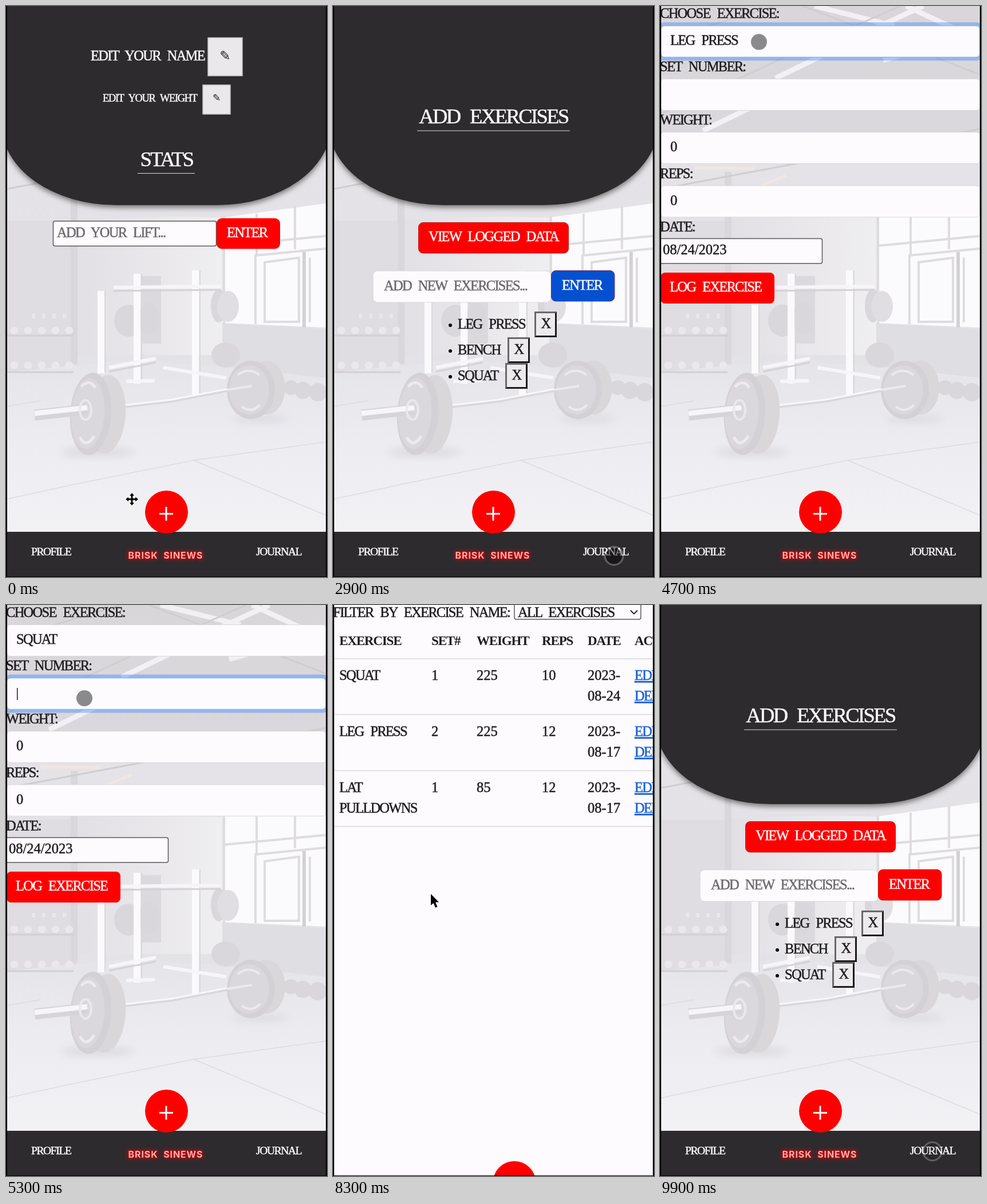
Write an HTML page that moves like this. It is 561 by 998 pixels and loops after 10000 ms.

```html
<!DOCTYPE html>
<html lang="en">
<head>
<meta charset="utf-8">
<title>Workout log</title>
<style>
html, body { margin: 0; width: 100%; height: 100%; overflow: hidden; background: #000; }
svg { display: block; width: 561px; height: 998px; }
text {
  font: 24.5px "Liberation Serif", serif; letter-spacing: -.07em; word-spacing: .3em;
  fill: currentColor; stroke: currentColor; stroke-width: .5px; white-space: pre;
}
.h { font-size: 36.5px; }
.s { font-size: 18.4px; }
.nav { font-size: 19.5px; }
.n { letter-spacing: 0; }
.b { font-size: 23px; font-weight: bold; letter-spacing: -.05em; stroke-width: 0; }
.pen { font-family: "DejaVu Sans", sans-serif; stroke-width: 0; }
.brand { font: 700 16px Inter, sans-serif; letter-spacing: .9px; stroke: #f22; stroke-width: .7px; filter: drop-shadow(0 0 4px #f00); }
.light { color: #fcfafd; }
.dark { color: #1f1d20; }
.hint { color: #6c6a6d; }
.link { color: #1a62d8; text-decoration: underline; }
.bar { fill: #2d2b2e; }
.red { fill: #f00; }
.in { fill: #fdfbfe; stroke: #d9d7dc; x: 1.5px; width: 557.5px; height: 55px; rx: 6px; }
.box { fill: #fdfbfe; stroke: #5a585b; stroke-width: 1.5; }
.rule { fill: none; stroke: #d9d8dc; stroke-width: 1.5; }

/* one percent is 100 ms */
.profile, .add, .form, .table, .squat, .blue, .ph, .typed, .old, .new, .z1, .z2, .key, .caret, .move, .touch, .arrow {
  animation: 10s step-end infinite;
}
.profile { animation-name: profile; }
.add { animation-name: add; }
.form { animation-name: form; }
.table { animation-name: table; }
.squat { animation-name: squat; }
.blue { animation-name: blue; }
.ph { animation-name: ph; }
.typed { animation-name: typed; }
.old { animation-name: old; }
.new { animation-name: new; }
.z1 { animation-name: z1; }
.z2 { animation-name: z2; }
.caret { animation-name: caret; }
.move { animation-name: move; }
.touch { animation-name: touch; }
.arrow { animation-name: arrow; }
.key { animation-name: key; animation-delay: calc(var(--t) - 17.5s); }
@keyframes profile { 0% { opacity: 1 } 5%, 100% { opacity: 0 } }
@keyframes add { 0% { opacity: 0 } 5% { opacity: 1 } 37% { opacity: 0 } 94%, 100% { opacity: 1 } }
@keyframes form { 0% { opacity: 0 } 37% { opacity: 1 } 76% { opacity: 0 } 88% { opacity: 1 } 94%, 100% { opacity: 0 } }
@keyframes table { 0% { opacity: 0 } 76% { opacity: 1 } 88%, 100% { opacity: 0 } }
@keyframes squat { 0% { opacity: 0 } 24%, 100% { opacity: 1 } }
@keyframes blue { 0% { opacity: 0 } 24% { opacity: 1 } 37%, 100% { opacity: 0 } }
@keyframes ph { 0% { opacity: 1 } 15% { opacity: 0 } 24%, 100% { opacity: 1 } }
@keyframes typed { 0% { opacity: 1 } 24%, 100% { opacity: 0 } }
@keyframes old { 0% { opacity: 1 } 50% { opacity: 0 } 88%, 100% { opacity: 1 } }
@keyframes new { 0% { opacity: 0 } 50% { opacity: 1 } 88%, 100% { opacity: 0 } }
@keyframes z1 { 0% { opacity: 1 } 62% { opacity: 0 } 88%, 100% { opacity: 1 } }
@keyframes z2 { 0% { opacity: 1 } 70% { opacity: 0 } 88%, 100% { opacity: 1 } }
@keyframes key { 0% { visibility: hidden } 75%, 100% { visibility: visible } }
@keyframes caret {
  0% { transform: translate(-9px, 0) }
  11% { transform: translate(89px, 480px) }
  15% { transform: translate(102px, 480px) }
  16% { transform: translate(118px, 480px) }
  17% { transform: translate(135px, 480px) }
  18% { transform: translate(151px, 480px) }
  19% { transform: translate(165px, 480px) }
  23.5% { transform: translate(-9px, 0) }
  51.2% { transform: translate(19px, 145px) }
  55.5% { transform: translate(31px, 145px) }
  60% { transform: translate(31px, 238px) }
  63% { transform: translate(43px, 238px) }
  64% { transform: translate(56px, 238px) }
  67.2% { transform: translate(31px, 331px) }
  71% { transform: translate(43px, 331px) }
  74%, 100% { transform: translate(-9px, 0) }
}

.ring { opacity: 0; fill: none; animation: 10s linear infinite; }
.ring rect { x: -1.5px; width: 563.5px; height: 61px; rx: 9px; stroke: #0d6efd; stroke-opacity: .32; stroke-width: 6; }
.ring .in { fill: none; x: 1.5px; width: 557.5px; height: 55px; rx: 6px; stroke: #86b7fe; stroke-opacity: 1; stroke-width: 1.5; }
.ring .name { x: 67px; width: 317px; }
.r0 { animation-name: r0; }
.r1 { animation-name: r1; }
.r2 { animation-name: r2; }
.r3 { animation-name: r3; }
.r4 { animation-name: r4; }
@keyframes r0 { 0%, 11% { opacity: 0 } 12.5%, 23.5% { opacity: 1 } 25%, 100% { opacity: 0 } }
@keyframes r1 { 0%, 42% { opacity: 0 } 43.5%, 51% { opacity: 1 } 52.5%, 100% { opacity: 0 } }
@keyframes r2 { 0%, 51% { opacity: 0 } 52.5%, 59.5% { opacity: 1 } 61%, 100% { opacity: 0 } }
@keyframes r3 { 0%, 59.5% { opacity: 0 } 61%, 67.2% { opacity: 1 } 68.7%, 100% { opacity: 0 } }
@keyframes r4 { 0%, 67.2% { opacity: 0 } 68.7%, 74% { opacity: 1 } 75.5%, 100% { opacity: 0 } }

.cursor { animation: path 10s ease-in-out infinite; }
.disc { animation: disc 10s linear infinite; }
@keyframes path {
  0% { transform: translate(220px, 862px) }
  2% { transform: translate(262px, 950px) }
  4%, 6% { transform: translate(280px, 890px) }
  10.5%, 19% { transform: translate(190px, 492px) }
  23%, 25% { transform: translate(436px, 490px) }
  29%, 37.5% { transform: translate(491px, 961px) }
  41%, 46% { transform: translate(180px, 59px) }
  49%, 50.2% { transform: translate(150px, 75px) }
  51.5%, 57% { transform: translate(137px, 163px) }
  59.5%, 65% { transform: translate(150px, 252px) }
  67%, 71% { transform: translate(163px, 353px) }
  74.5%, 84% { transform: translate(171px, 505px) }
  91%, 94.5% { transform: translate(280px, 888px) }
  98.5%, 100% { transform: translate(476px, 955px) }
}
@keyframes disc { 0%, 97% { opacity: 1 } 98.8%, 100% { opacity: .15 } }
@keyframes move { 0% { opacity: 1 } 1.5%, 100% { opacity: 0 } }
@keyframes touch { 0% { opacity: 0 } 1.5% { opacity: 1 } 76% { opacity: 0 } 90%, 100% { opacity: 1 } }
@keyframes arrow { 0% { opacity: 0 } 76% { opacity: 1 } 90%, 100% { opacity: 0 } }
</style>
</head>
<body>
<svg viewBox="0 0 561 998">
  <defs>
    <linearGradient id="room" x2="0" y2="1">
      <stop offset="0" stop-color="#d9d6da"/><stop offset=".36" stop-color="#dad8dc"/>
      <stop offset=".42" stop-color="#e5e3e7"/><stop offset=".64" stop-color="#e3e2e6"/>
    </linearGradient>
    <linearGradient id="floor" x2="0" y2="1">
      <stop offset="0" stop-color="#e4e4e9"/><stop offset=".5" stop-color="#edecf1"/><stop offset="1" stop-color="#f2f1f4"/>
    </linearGradient>
    <linearGradient id="wall"><stop offset="0" stop-color="#e2e0e4"/><stop offset="1" stop-color="#efeef1"/></linearGradient>
    <filter id="soft"><feGaussianBlur stdDeviation="7"/></filter>
    <filter id="drop" x="-5%" width="110%" height="115%" color-interpolation-filters="sRGB">
      <feDropShadow dx="0" dy="4" stdDeviation="5" flood-opacity=".5"/>
    </filter>
    <path id="head" class="bar" filter="url(#drop)" d="M-8 0H569V206A200 142 0 0 1 369 348H192A200 142 0 0 1 -8 206Z"/>
    <g id="x">
      <path fill="#eceaed" d="M0 0h39v45H0z"/>
      <path fill="#6a686b" d="M0 45V0H39L36 3H3V42Z"/><path fill="#1c1a1d" d="M39 0V45H0L3 42H36V3Z"/>
      <text x="19.5" y="29" text-anchor="middle" class="dark">X</text>
    </g>
    <g id="plus">
      <circle r="37.5" class="red"/><path d="M-12.5 3H11.5M-.5 -9V15" stroke="#fff" stroke-width="3"/>
    </g>
  </defs>

  <g id="gym" fill="none">
    <rect width="561" height="640" fill="url(#room)"/>
    <path fill="url(#wall)" d="M125 372 300 368 378 370V610H125Z"/>
    <path fill="#dfdde1" d="M0 375H125V640H0Z"/>
    <path fill="#d9d7db" d="M113 290h12v335h-12Z"/>
    <path stroke="#f2f0f4" stroke-width="9" d="M75 218 170 172M202 126 310 74M270 0 410 35M330 60 460 0M390 95 559 48M430 0 559 60"/>
    <path stroke="#d0cdd1" stroke-width="3" d="M0 60 200 0M0 190 250 75 420 0M250 0 559 120M0 320 559 215"/>
    <path stroke="#f1e6e2" stroke-width="5" d="M60 283 165 284M160 322 220 296"/>
    <path fill="#fbfafd" d="M383 369 559 345V562L378 554Z"/>
    <path stroke="#dedce0" stroke-width="4" d="M381 368V555M381 419 559 402M438 363V434M505 350V425M436 556V436L559 424M452 448V552H512V440ZM531 440V553"/>
    <path stroke="#d3d1d5" stroke-width="6" d="M521 430V562"/>
    <path fill="#dfdee2" d="M378 555 559 565V655H378Z"/>
    <path fill="url(#floor)" d="M0 640 220 618 378 630 559 650V920H0Z"/>
    <path stroke="#dddbe0" stroke-width="1.500" d="M0 862 120 836 328 794 559 890M328 794 559 762M0 700 60 690"/>
    <path stroke="#d2d0d4" stroke-width="3" d="M2 576H118M2 640H118"/>
    <path stroke="#eae8ec" stroke-width="13" stroke-linecap="round" stroke-dasharray="1 23" d="M14 567H118M14 628H118"/>
    <path stroke="#e9e7ea" stroke-width="8" stroke-dasharray="6 12" d="M45 542H105"/>
    <path fill="#dbd9dd" d="M236 472H271V590H236Z"/>
    <g fill="#d9d7db">
      <ellipse cx="214" cy="550" rx="25" ry="28"/><ellipse cx="250" cy="546" rx="18" ry="28"/>
      <ellipse cx="372" cy="524" rx="14" ry="29"/><ellipse cx="388" cy="525" rx="19" ry="27" fill="#e0dee2"/>
      <ellipse cx="384" cy="610" rx="25" ry="22"/>
      <circle cx="498" cy="667" r="13"/><circle cx="519" cy="672" r="15"/><circle cx="545" cy="675" r="16"/>
    </g>
    <path stroke="#faf9fc" stroke-width="12" d="M229 468V660M331 462V682M166 498V642"/>
    <path stroke="#d9d7db" stroke-width="2" d="M237 468V658M339 462V680M173 498V640"/>
    <path stroke="#f7f5f9" stroke-width="6" d="M188 492 375 490M180 632 262 616M275 632 385 650M210 656 260 655"/>
    <path stroke="#d5d2d6" stroke-width="3" d="M188 498 375 496M180 639 262 623"/>
    <g filter="url(#soft)" fill="#dddce1">
      <ellipse cx="160" cy="780" rx="65" ry="9"/><ellipse cx="445" cy="721" rx="50" ry="7"/>
    </g>
    <path stroke="#dad7db" stroke-width="6" d="M205 700 290 690 405 668"/>
    <path stroke="#f8f7fa" stroke-width="3" d="M205 698 290 688 405 666"/>
    <g transform="rotate(4 165 713)">
      <ellipse cx="175" cy="713" rx="34" ry="69" fill="#dad7db"/>
      <ellipse cx="148" cy="714" rx="36" ry="72" fill="#d4d1d6"/>
      <ellipse cx="143" cy="714" rx="29" ry="62" fill="#dad8dc"/>
      <path stroke="#eceaee" stroke-width="5" d="M128 668Q141 652 153 668M132 756Q144 776 157 752"/>
    </g>
    <path stroke="#d7d4d9" stroke-width="19" d="M50 715 142 705"/>
    <path stroke="#f6f5f8" stroke-width="9" d="M50 712 142 702"/>
    <ellipse cx="139" cy="706" rx="10" ry="17" stroke="#eae8ec" stroke-width="4"/>
    <ellipse cx="455" cy="667" rx="33" ry="47" fill="#dad7db"/>
    <ellipse cx="428" cy="671" rx="42" ry="51" fill="#d4d1d6"/>
    <ellipse cx="425" cy="671" rx="35" ry="43" fill="#dad8dc"/>
    <path stroke="#ebe9ed" stroke-width="4" d="M405 645Q424 630 443 645M412 700Q428 713 444 697M386 671 430 664"/>
  </g>

  <g class="profile">
    <use href="#head"/>
    <g fill="#eae8eb" stroke="#c4c2c6" stroke-width="1.5">
      <path d="M353 55.500h60v66.500h-60ZM344 138h48v51h-48Z"/>
    </g>
    <g class="light">
      <text x="148" y="95">EDIT YOUR NAME</text>
      <text x="169" y="167" class="s">EDIT YOUR WEIGHT</text>
      <text x="280.500" y="280" class="h" text-anchor="middle">STATS</text>
    </g>
    <path d="M230 292.500H330" stroke="#dddbde"/>
    <text x="382" y="95" class="pen dark" text-anchor="middle" style="font-size:23px">✎</text>
    <text x="367.500" y="166" class="pen dark" text-anchor="middle" style="font-size:17px">✎</text>
    <rect class="box" x="82.500" y="376" width="285" height="43.500" rx="3"/>
    <text x="89" y="404" class="hint">ADD YOUR LIFT...</text>
    <rect class="red" x="368" y="371" width="111" height="53.500" rx="9"/>
    <text x="386" y="404" class="light">ENTER</text>
  </g>

  <g class="add">
    <use href="#head"/>
    <text x="280.500" y="205" class="h light" text-anchor="middle">ADD EXERCISES</text>
    <path d="M147 218H414" stroke="#dddbde"/>
    <rect class="red" x="149.500" y="378.500" width="262" height="53.500" rx="8" stroke="#b8100c"/>
    <text x="280.500" y="411" class="light" text-anchor="middle">VIEW LOGGED DATA</text>
    <rect class="in" y="463" style="x:70px;width:311px;rx:8px"/>
    <g class="ring r0"><rect class="name" y="460"/><rect class="in" y="463" style="x:70px;width:311px"/></g>
    <text x="89" y="497" class="hint ph">ADD NEW EXERCISES...</text>
    <g class="typed"><text x="89" y="497" class="dark"><tspan class="key" style="--t:1.5s">S</tspan><tspan class="key" style="--t:1.6s">Q</tspan><tspan class="key" style="--t:1.7s">U</tspan><tspan class="key" style="--t:1.8s">A</tspan><tspan class="key" style="--t:1.9s">T</tspan></text></g>
    <rect class="red" x="381.500" y="462.500" width="110.500" height="53.500" rx="8" stroke="#c8100c"/>
    <rect class="blue" x="381.500" y="462.500" width="110.500" height="53.500" rx="8" fill="#0450d0"/>
    <text x="400" y="496" class="light">ENTER</text>
    <g class="dark">
      <circle cx="205" cy="558" r="3"/><text x="218" y="564">LEG PRESS</text>
      <use href="#x" x="352" y="534"/>
      <circle cx="205" cy="603" r="3"/><text x="218" y="609">BENCH</text>
      <use href="#x" x="305" y="579"/>
      <g class="squat">
        <circle cx="205" cy="648" r="3"/><text x="218" y="654">SQUAT</text>
        <use href="#x" x="301" y="624"/>
      </g>
    </g>
  </g>

  <g class="form">
    <rect class="in" y="34.500"/><rect class="in" y="127.500"/><rect class="in" y="220.500"/><rect class="in" y="314"/>
    <g class="ring r1"><rect y="31.500"/><rect class="in" y="34.500"/></g>
    <g class="ring r2"><rect y="124.500"/><rect class="in" y="127.500"/></g>
    <g class="ring r3"><rect y="217.500"/><rect class="in" y="220.500"/></g>
    <g class="ring r4"><rect y="311"/><rect class="in" y="314"/></g>
    <g class="dark">
      <text y="21">CHOOSE EXERCISE:</text>
      <text y="114">SET NUMBER:</text>
      <text y="207">WEIGHT:</text>
      <text y="301">REPS:</text>
      <text y="394">DATE:</text>
      <text x="18" y="68" class="old">LEG PRESS</text>
      <text x="18" y="68" class="new">SQUAT</text>
      <text x="18" y="161" class="n"><tspan class="key" style="--t:5.5s">1</tspan></text>
      <text x="18" y="254" class="n z1">0</text>
      <text x="18" y="254" class="n"><tspan class="key" style="--t:6.2s">2</tspan><tspan class="key" style="--t:6.3s">2</tspan><tspan class="key" style="--t:6.4s">5</tspan></text>
      <text x="18" y="348" class="n z2">0</text>
      <text x="18" y="348" class="n"><tspan class="key" style="--t:7s">1</tspan><tspan class="key" style="--t:7.1s">0</tspan></text>
    </g>
    <rect class="box" x="-4" y="406.500" width="287.500" height="43.500" rx="3"/>
    <text x="5" y="434" class="n dark">08/24/2023</text>
    <rect class="red" x="1" y="466" width="199" height="54" rx="8"/>
    <text x="17" y="499" class="light">LOG EXERCISE</text>
  </g>

  <rect class="bar" y="919" width="561" height="79"/>
  <g class="light">
    <text x="44" y="960" class="nav">PROFILE</text>
    <text x="437" y="960" class="nav">JOURNAL</text>
  </g>
  <text x="279" y="966" class="brand" text-anchor="middle" color="#ffd2ce">BRISK SINEWS</text>
  <use href="#plus" x="280.500" y="884.500"/>

  <g class="table dark">
    <rect width="561" height="998" fill="#fdfbfe"/>
    <text y="21">FILTER BY EXERCISE NAME:</text>
    <rect class="box" x="317" y="-4" width="221" height="29" rx="3"/>
    <text x="323" y="21">ALL EXERCISES</text>
    <path d="M520 9.500 526 15.500 532 9.500" fill="none" stroke="#1f1d20" stroke-width="1.800"/>
    <path class="rule" d="M2 94H559M2 191.500H559M2 289.500H559M2 387H559"/>
    <g>
      <text x="11" y="70" class="b">EXERCISE</text><text x="172" y="70" class="b">SET#</text>
      <text x="251" y="70" class="b">WEIGHT</text><text x="365" y="70" class="b">REPS</text>
      <text x="445" y="70" class="b">DATE</text><text x="527" y="70" class="b">ACTIONS</text>
    </g>
    <g id="rows"></g>
    <use href="#plus" x="317" y="1009.500"/>
  </g>

  <rect class="caret" width="1.500" height="21" fill="#1f1d20"/>
  <path fill="#000" d="M0 0H2V998H0ZM559 0H561V998H559ZM0 997H561V998H0Z"/>

  <g class="cursor">
    <g class="touch">
      <circle class="disc" r="14" fill-opacity=".45"/>
      <circle r="16" fill="none" stroke="#fff" stroke-opacity=".25" stroke-width="3"/>
    </g>
    <path class="move" stroke="#fff" paint-order="stroke" stroke-width="2"
      d="M0 -11 4 -6H1.500V-1.500H6V-4L11 0 6 4V1.500H1.500V6H4L0 11 -4 6H-1.500V1.500H-6V4L-11 0 -6 -4V-1.500H-1.500V-6H-4Z"/>
    <path class="arrow" stroke="#fff" paint-order="stroke" stroke-width="3" d="M0 0V20L4.500 16 8 24 11.500 22.500 8 14.500H14Z"/>
  </g>
</svg>
<script>
const rows = [
  ["SQUAT", "", 1, 225, 10, "08-24"],
  ["LEG PRESS", "", 2, 225, 12, "08-17"],
  ["LAT", "PULLDOWNS", 1, 85, 12, "08-17"]
];
const cell = (x, y, s, c = "") => `<text x="${x}" y="${y}" class="${c}">${s}</text>`;
document.getElementById("rows").innerHTML = rows.map(([name, rest, set, weight, reps, day], i) => {
  const y = 131 + i * 98, y2 = y + 36;
  return cell(11, y, name) + cell(11, y2, rest) + cell(172, y, set, "n") + cell(251, y, weight, "n") +
    cell(365, y, reps, "n") + cell(445, y, "2023-", "n") + cell(445, y2, day, "n") +
    cell(527, y, "EDIT", "link") + cell(527, y2, "DELETE", "link");
}).join("");
</script>
</body>
</html>
```
